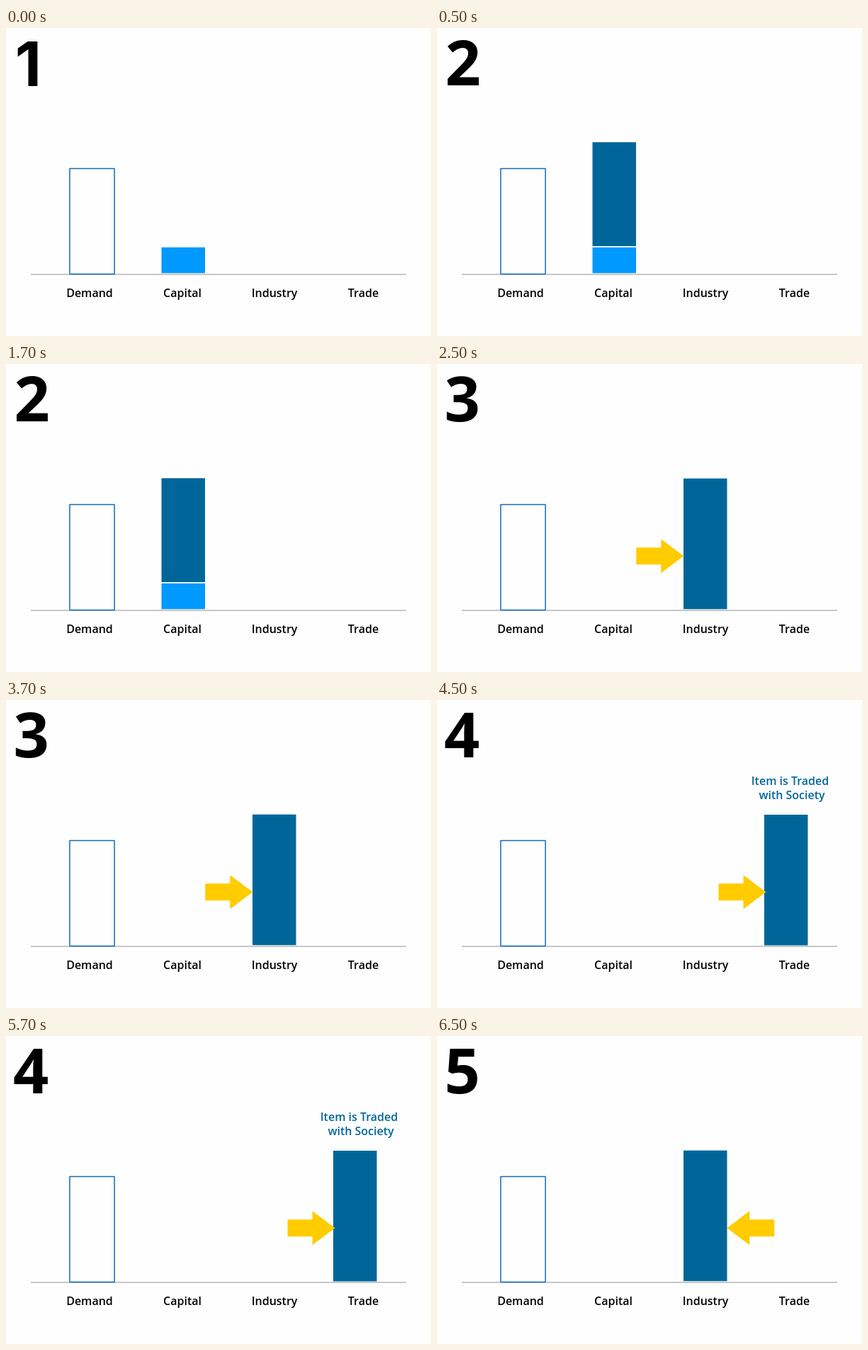
These frames come from a looping animation (600 px wide and 435 px high, 8000 ms). An HTML page:

```html
<!DOCTYPE html>
<html lang="en">
<head>
<meta charset="utf-8">
<title>Demand, capital, industry, trade</title>
<style>
html, body { margin: 0; width: 100%; height: 100%; overflow: hidden; background: #fefefe; }
svg { display: block; width: 600px; height: 435px; }
text { font-family: "Open Sans", "Noto Sans", sans-serif; }
.label { font-size: 16px; font-weight: 600; text-anchor: middle; }
.num { font-size: 88px; font-weight: 700; text-anchor: middle; }
.one { font-family: Inter, sans-serif; font-size: 86.5px; text-anchor: end; }
.dark { fill: #069; }
.light { fill: #09f; }
.arrow { fill: #fc0; }
.step { visibility: hidden; animation: 8s step-end infinite; }
.s1 { animation-name: s1; }
.s2 { animation-name: s2; }
.s3 { animation-name: s3; }
.s4 { animation-name: s4; }
.s5 { animation-name: s5; }
.s12 { animation-name: s12; }
@keyframes s1 { 0% { visibility: visible } 6.25%, 100% { visibility: hidden } }
@keyframes s2 { 0% { visibility: hidden } 6.25% { visibility: visible } 31.25%, 100% { visibility: hidden } }
@keyframes s3 { 0% { visibility: hidden } 31.25% { visibility: visible } 56.25%, 100% { visibility: hidden } }
@keyframes s4 { 0% { visibility: hidden } 56.25% { visibility: visible } 81.25%, 100% { visibility: hidden } }
@keyframes s5 { 0% { visibility: hidden } 81.25%, 100% { visibility: visible } }
@keyframes s12 { 0% { visibility: visible } 31.25%, 100% { visibility: hidden } }
</style>
</head>
<body>
<svg viewBox="0 0 600 435">
  <defs>
    <path id="arrow" class="arrow" d="M0 0L-32-24V-12H-67V12H-32V24Z"/>
    <rect id="bar" class="dark" width="61.5" height="184.5"/>
  </defs>

  <path d="M35 348H565" stroke="#b4b4b4" stroke-width="1.6"/>
  <rect x="89.9" y="198.6" width="63.2" height="148.8" rx=".5" fill="#fefefe" stroke="#0f6cbd" stroke-width="1.5"/>

  <text class="label" x="118" y="379.5">Demand</text>
  <text class="label" x="249" y="379.5">Capital</text>
  <text class="label" x="379" y="379.5">Industry</text>
  <text class="label" x="504.5" y="379.5">Trade</text>

  <rect class="light step s12" x="219.5" y="309.8" width="61.5" height="36.4"/>

  <g class="step s1">
    <text class="num one" x="50" y="82">1</text>
  </g>
  <g class="step s2">
    <text class="num" x="36.5" y="81">2</text>
    <rect class="dark" x="219.5" y="161.3" width="61.5" height="146.7"/>
  </g>
  <g class="step s3">
    <text class="num" x="35.5" y="81">3</text>
    <use href="#bar" x="348" y="161.7"/>
    <use href="#arrow" x="348.3" y="271.2"/>
  </g>
  <g class="step s4">
    <text class="num" x="35" y="81">4</text>
    <g class="dark">
      <text class="label" x="498.5" y="119.5">Item is Traded</text>
      <text class="label" x="501" y="139.5">with Society</text>
    </g>
    <use href="#bar" x="462" y="162"/>
    <use href="#arrow" x="464.5" y="271.2"/>
  </g>
  <g class="step s5">
    <text class="num" x="35.5" y="81">5</text>
    <use href="#bar" x="348" y="161.7"/>
    <use href="#arrow" transform="translate(409.3 271.2) scale(-1 1)"/>
  </g>
</svg>
</body>
</html>
```
